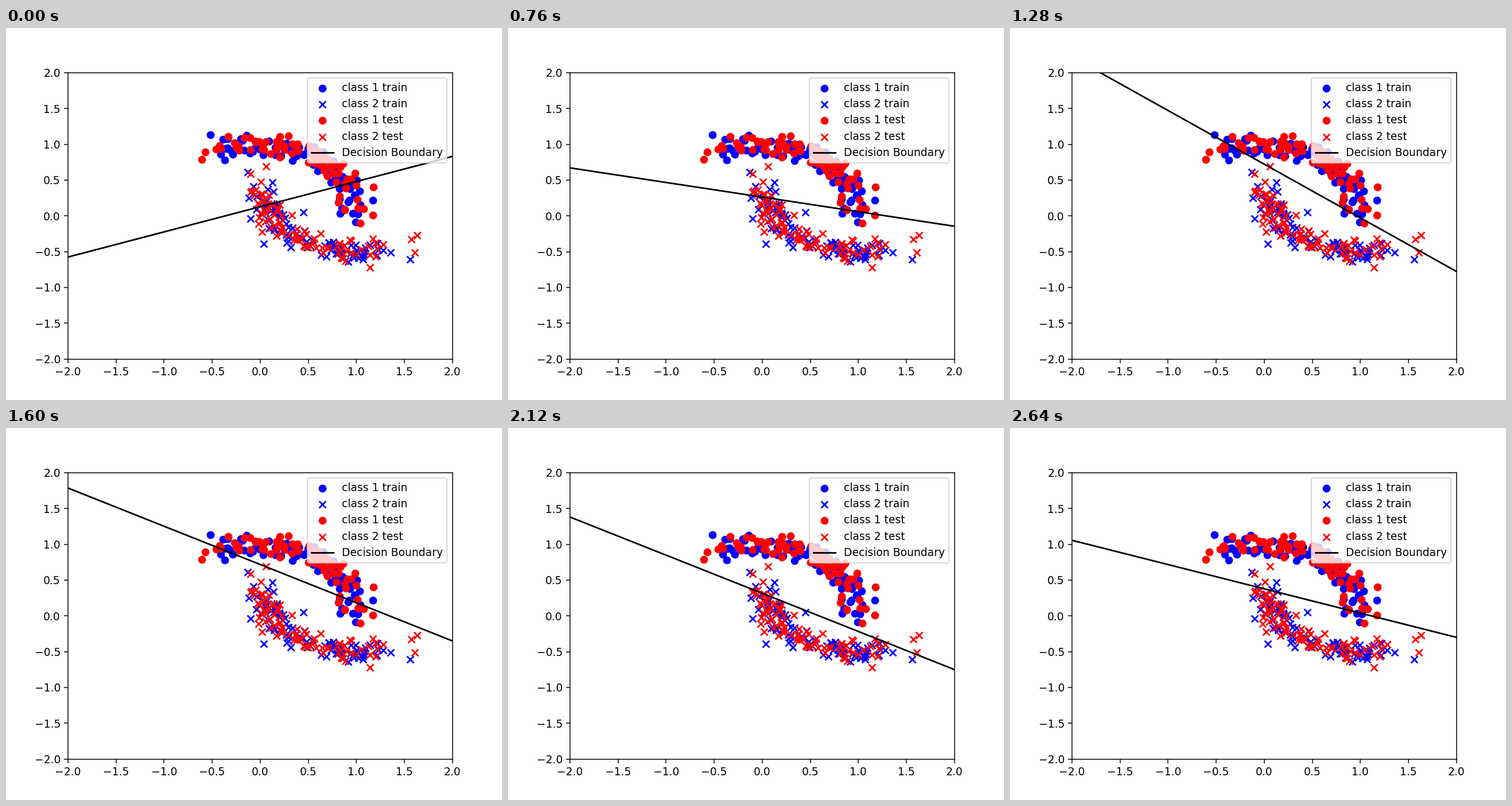
A matplotlib script for the animation above (2.68 s loop, 864x648 px).

```python
import numpy as np
import matplotlib.pyplot as plt
from matplotlib.animation import FuncAnimation

FRAMES = 67
INTERVAL = 40
LIM = 2
SIZE = 40

rng = np.random.default_rng(7)


def upper_moon(t):
    return np.cos(t), np.sin(t)


def lower_moon(t):
    return 1 - np.cos(t), 0.5 - np.sin(t)


def sample(moon, end, count, strays):
    """Noisy points along an arc, plus a few that lie apart from it."""
    t = rng.uniform(0.05, end, count)
    noise = rng.normal(0, 0.085, (2, count)).clip(-0.16, 0.16)
    return np.hstack([np.array(moon(t)) + noise, np.transpose(strays)])


upper_train = sample(upper_moon, 2.0, 75, [
    (-.52, 1.13), (-.39, 1.07), (1.17, .22), (.83, .03), (.99, -.09)])
lower_train = sample(lower_moon, 1.95, 80, [
    (-.13, .61), (-.10, -.04), (.04, -.39), (.45, .05), (1.56, -.61)])
upper_test = sample(upper_moon, 2.0, 75, [
    (-.61, .79), (-.57, .89), (1.18, .40), (1.17, .01), (1.04, -.10)])
lower_test = sample(lower_moon, 1.9, 85, [
    (.06, .69), (.02, -.22), (1.14, -.72), (1.61, -.51), (1.57, -.33),
    (1.63, -.27)])

# Boundary poses: step, height at the left edge, height at the right edge
POSES = np.array([
    (0, -.575, .83), (7, -.195, .535), (13, 1.495, -.755), (19, .67, -.145),
    (25, 2.47, -1.53), (32, 2.22, -.776), (40, 1.785, -.35),
    (46, 1.885, -.895), (53, 1.38, -.75), (66, 1.055, -.30)])


def boundary_ends(step):
    steps, left, right = POSES.T
    return [np.interp(step, steps, side) for side in (left, right)]


fig, ax = plt.subplots(figsize=(6.4, 4.8), dpi=135)

groups = [
    (upper_train, "blue", "o", "class 1 train"),
    (lower_train, "blue", "x", "class 2 train"),
    (upper_test, "red", "o", "class 1 test"),
    (lower_test, "red", "x", "class 2 test"),
]
for (x, y), color, marker, label in groups:
    ax.scatter(x, y, s=SIZE, c=color, marker=marker, label=label)

boundary, = ax.plot([-LIM, LIM], boundary_ends(0), color="black",
                    label="Decision Boundary")
ax.set_xlim(-LIM, LIM)
ax.set_ylim(-LIM, LIM)
ax.legend(loc="upper right")


def update(step):
    boundary.set_ydata(boundary_ends(step))
    return boundary,


anim = FuncAnimation(fig, update, frames=FRAMES, interval=INTERVAL,
                     repeat=True, repeat_delay=0)
plt.show()
```
